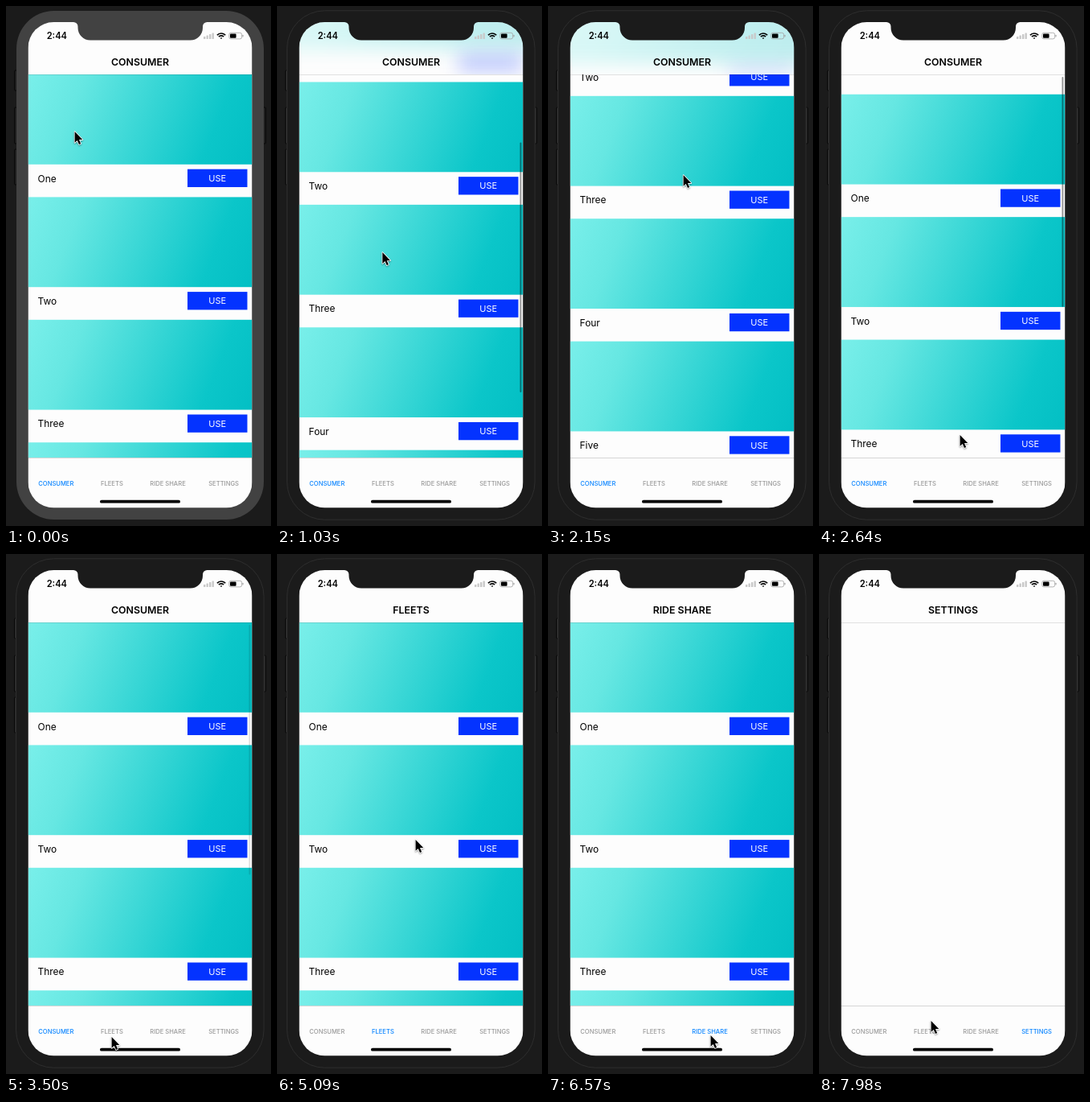
Animation of 330x646 px, one loop 8000 ms. Source, as an HTML page with a canvas:

```html
<!DOCTYPE html>
<html lang="en">
<head>
<meta charset="utf-8">
<title>Tabbed list</title>
<style>
html, body { margin: 0; width: 100%; height: 100%; overflow: hidden; background: #1b1b1b; }
canvas { display: block; width: 330px; height: 646px; }
</style>
</head>
<body>
<canvas id="stage"></canvas>
<script>
const W = 330, H = 646, LOOP = 8000;
const canvas = document.getElementById('stage');
const ctx = canvas.getContext('2d');
const dpr = window.devicePixelRatio || 1;
canvas.width = W * dpr;
canvas.height = H * dpr;

const FONT = 'Inter, "Liberation Sans", sans-serif';
const SCREEN = { x: 27.5, y: 20, w: 279, h: 603.5 };
const TOP = 85, BOTTOM = 561, PITCH = 152.4, CARD = 111.8, MAX = 278;
const ROWS = ['One', 'Two', 'Three', 'Four', 'Five'];
const TABS = [
  { name: 'CONSUMER', from: 0 },
  { name: 'FLEETS', from: 3830 },
  { name: 'RIDE SHARE', from: 6570 },
  { name: 'SETTINGS', from: 7320 }
];

// Pointer stops: start, end, x, y
const POINTER = [
  [60, 190, 66, 99], [410, 720, 132, 448], [760, 1370, 129, 105],
  [1500, 2000, 168, 209], [2150, 2640, 175, 532], [3050, 3500, 131, 599],
  [4370, 5090, 172, 354], [5760, 6240, 202, 597], [6640, 7020, 289, 586],
  [7700, 7980, 139, 579]
];
// List gestures: start, end, release, settled, finger travel
const GESTURES = [
  [760, 1370, 1450, 1800, 343],
  [2150, 2640, 2960, 3300, -323],
  [5180, 5450, 5490, 5990, 311]
];

const clamp = (v, lo, hi) => Math.min(hi, Math.max(lo, v));
const ease = p => p * p * (3 - 2 * p);
const progress = (t, a, b) => clamp((t - a) / (b - a), 0, 1);

function pointerAt(t) {
  return POINTER.reduce(([x, y], [a, b, tx, ty]) => {
    const p = ease(progress(t, a, b));
    return [x + (tx - x) * p, y + (ty - y) * p];
  }, [85, 155]);
}

// Past either end the list follows the finger at 55 percent.
function rubber(raw) {
  const inside = clamp(raw, 0, MAX);
  return inside + (raw - inside) * 0.55;
}

function listAt(t, tab) {
  let scroll = 0, bar = 0;
  for (const [start, end, release, settled, travel] of GESTURES) {
    if (t < start || start < tab.from) continue;
    const raw = scroll + travel * ease(progress(t, start, end));
    const back = 1 - (1 - progress(t, release, settled)) ** 3;
    const inside = clamp(raw, 0, MAX);
    scroll = inside + (rubber(raw) - inside) * (1 - back);
    bar = progress(t, start, start + 50) - progress(t, settled + 100, settled + 240);
  }
  return { scroll, bar };
}

function rect(x, y, w, h, color) {
  ctx.fillStyle = color;
  ctx.fillRect(x, y, w, h);
}

function round(x, y, w, h, r, fill, stroke, width = 1) {
  ctx.beginPath();
  ctx.roundRect(x, y, w, h, r);
  if (fill) { ctx.fillStyle = fill; ctx.fill(); }
  if (stroke) { ctx.strokeStyle = stroke; ctx.lineWidth = width; ctx.stroke(); }
}

function text(str, x, y, size, weight, color, align = 'center') {
  ctx.font = `${weight} ${size}px ${FONT}`;
  ctx.textAlign = align;
  ctx.fillStyle = color;
  ctx.fillText(str, x, y);
}

function clipped(y, h, draw) {
  ctx.save();
  ctx.beginPath();
  ctx.rect(SCREEN.x, y, SCREEN.w, h);
  ctx.clip();
  draw();
  ctx.restore();
}

// Bands stand at right angles to the card's diagonal.
function cardFill(y) {
  const g = ctx.createLinearGradient(SCREEN.x, y, SCREEN.x + SCREEN.w, y + CARD);
  g.addColorStop(0, '#79efea');
  g.addColorStop(0.22, '#66e7e2');
  g.addColorStop(0.8, '#0bc6c9');
  g.addColorStop(1, '#03bfc4');
  return g;
}

function drawList(scroll) {
  clipped(TOP, BOTTOM - TOP, () => ROWS.forEach((name, i) => {
    const y = TOP + i * PITCH - scroll;
    rect(SCREEN.x, y, SCREEN.w, CARD, cardFill(y));
    rect(226, y + 117.7, 74.5, 22.3, '#0433ff');
    text('USE', 263.3, y + 133, 11, 400, '#fff');
    text(name, 39.6, y + 133.5, 11.9, 400, '#000', 'left');
  }));
}

// Content passing under the translucent header.
function drawHeaderBlur(scroll) {
  const under = (x, y, w, h, fill) => {
    const cut = Math.min(h, TOP - y);
    if (cut > 0) rect(x, y, w, cut, fill);
  };
  clipped(SCREEN.y, TOP - SCREEN.y, () => {
    ctx.globalAlpha = 0.25;
    ctx.filter = `blur(${11 * dpr}px)`;
    ROWS.forEach((_, i) => {
      const y = TOP + i * PITCH - scroll;
      under(0, y, W, CARD, cardFill(y));
      under(226, y + 117.7, 80, 22.3, '#0433ff');
    });
  });
}

function drawBar(scroll, alpha) {
  const pos = clamp(scroll, 0, MAX);
  const len = 310.5 - Math.abs(scroll - pos);
  ctx.globalAlpha = alpha;
  round(302.5, 88 + (469 - len) * pos / MAX, 1.9, len, 1, 'rgba(0,0,0,.42)');
  ctx.globalAlpha = 1;
}

function drawStatus() {
  text('2:44', 63.3, 41, 11.1, 600, '#000');
  for (let i = 0; i < 4; i++) {
    const h = 3 + i * 1.5;
    round(246 + i * 3.5, 41 - h, 2.4, h, 0.5, '#c9c9c9');
  }
  ctx.strokeStyle = '#000';
  ctx.lineWidth = 1.7;
  for (const r of [1, 4.2, 7]) {
    ctx.beginPath();
    ctx.arc(268, 41, r, -Math.PI * 0.76, -Math.PI * 0.24);
    ctx.stroke();
  }
  round(277.8, 33.3, 15.8, 7.6, 2.2, null, '#a2a2a2', 0.8);
  round(279, 34.5, 7.6, 5.2, 1, '#000');
  round(294.4, 35.7, 1.1, 2.8, 0.6, '#a2a2a2');
}

function drawBody(focused) {
  rect(0, 0, W, H, '#1b1b1b');
  const key = (x, y, h) => round(x, y, 3, h, 1, focused ? '#2b2b2b' : '#1e1e1e', '#080808');
  key(10.5, 80, 25);
  key(10.5, 126, 45);
  key(10.5, 178, 44);
  key(320.5, 126, 45);
  if (focused) round(12.5, 5.8, 308.6, 632.4, 47, '#1b1b1b', '#303030', 0.9);
  else round(13, 6, 308, 632, 47, '#424242');
}

function drawNotch(color) {
  const left = 89.5, right = 245, bottom = 42.5, r = 15.5, flare = 5.5;
  ctx.beginPath();
  ctx.moveTo(left - flare, SCREEN.y - 1);
  ctx.lineTo(left - flare, SCREEN.y);
  ctx.arcTo(left, SCREEN.y, left, bottom, flare);
  ctx.arcTo(left, bottom, right, bottom, r);
  ctx.arcTo(right, bottom, right, SCREEN.y, r);
  ctx.arcTo(right, SCREEN.y, right + flare, SCREEN.y, flare);
  ctx.lineTo(right + flare, SCREEN.y - 1);
  ctx.fillStyle = color;
  ctx.fill();
}

function drawPointer([x, y]) {
  ctx.save();
  ctx.translate(x + 0.6, y + 1);
  ctx.scale(0.9, 0.9);
  const arrow = new Path2D('M0 0V15.4L3.5 12.1L6 17.8L8.4 16.8L6 11.2H10.8Z');
  ctx.lineJoin = 'round';
  ctx.lineWidth = 1.8;
  ctx.strokeStyle = '#fff';
  ctx.shadowColor = 'rgba(0,0,0,.4)';
  ctx.shadowBlur = 2 * dpr;
  ctx.shadowOffsetY = dpr;
  ctx.stroke(arrow);
  ctx.shadowColor = 'transparent';
  ctx.fillStyle = '#000';
  ctx.fill(arrow);
  ctx.restore();
}

function draw(t) {
  ctx.setTransform(dpr, 0, 0, dpr, 0, 0);
  const focused = t >= GESTURES[0][0];
  const tab = TABS.filter(b => t >= b.from).pop();

  drawBody(focused);
  ctx.save();
  ctx.beginPath();
  ctx.roundRect(SCREEN.x, SCREEN.y, SCREEN.w, SCREEN.h, 32);
  ctx.clip();
  rect(SCREEN.x, SCREEN.y, SCREEN.w, SCREEN.h, '#fdfdfd');
  if (tab.name !== 'SETTINGS') {
    const { scroll, bar } = listAt(t, tab);
    drawList(scroll);
    drawHeaderBlur(scroll);
    drawBar(scroll, bar);
  }
  rect(SCREEN.x, TOP, SCREEN.w, 0.7, 'rgba(0,0,0,.16)');
  rect(SCREEN.x, BOTTOM, SCREEN.w, 0.8, 'rgba(0,0,0,.2)');
  drawStatus();
  text(tab.name, 167, 73.7, 12.35, 600, '#000');
  TABS.forEach((b, i) =>
    text(b.name, 62.3 + i * 69.6, 596, 7.6, 500, b === tab ? '#0a84ff' : '#999'));
  round(117, 613.8, 100, 3.7, 1.9, '#000');
  ctx.restore();
  drawNotch(focused ? '#1b1b1b' : '#424242');
  drawPointer(pointerAt(t));
}

const start = performance.now();
function loop() {
  draw((performance.now() - start) % LOOP);
  requestAnimationFrame(loop);
}
loop();
</script>
</body>
</html>
```
